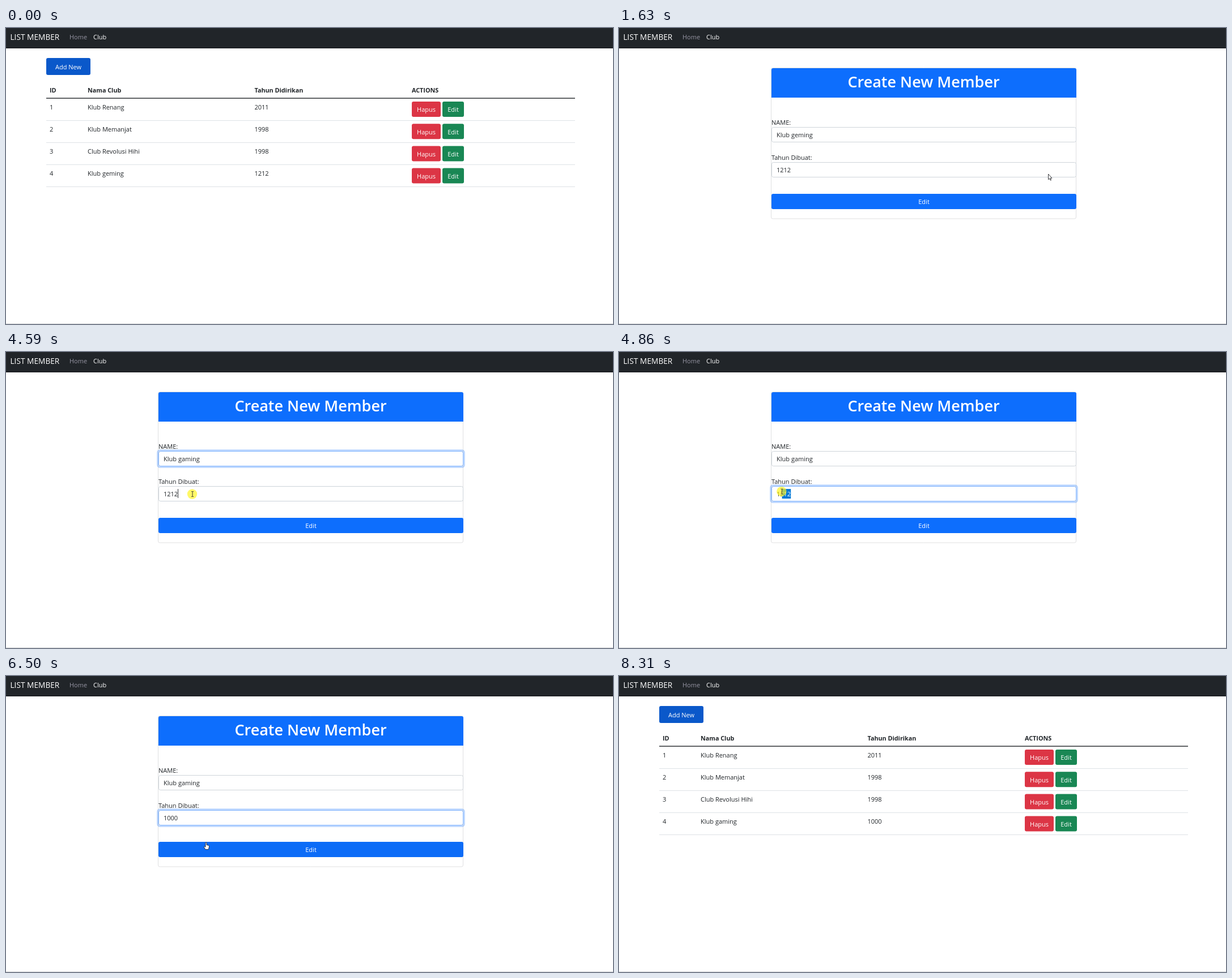
Recreate the animation shown at these times as an HTML page with a canvas. Size 1071 by 523 pixels, loop 8970 ms.

```html
<!DOCTYPE html>
<html lang="id">
<head>
<meta charset="utf-8">
<title>List Member</title>
<style>
html, body { margin: 0; width: 100%; height: 100%; overflow: hidden; background: #fff; }
canvas { display: block; }
</style>
</head>
<body>
<canvas id="stage" width="1071" height="523"></canvas>
<script>
const ctx = document.getElementById('stage').getContext('2d');
const LOOP = 8970, STEP = 68.5;
const INK = '#212529', BLUE = '#0d6efd', LINE = '#ced4da';
const FORM_OPEN = 1630, FORM_CLOSE = 7710;

// Pointer: time, x, y, shape, pressed
const ARROW = 'arrow', HAND = 'hand', BEAM = 'beam', NONE = '';
const track = [
  [0, 1037, 516, NONE], [410, 1037, 516, ARROW], [820, 890, 395, ARROW],
  [1090, 818, 301, ARROW], [1230, 797, 272, HAND], [1300, 794, 268, HAND],
  [1360, 794, 268, HAND, 1], [1430, 794, 268, HAND], [1629, 794, 268, HAND],
  [1630, 757, 258, ARROW], [2050, 530, 222, ARROW], [2320, 345, 195, BEAM],
  [2460, 320, 190, BEAM], [2530, 320, 190, BEAM, 1], [2660, 320, 190, BEAM],
  [2800, 320, 190, NONE], [4180, 320, 190, BEAM], [4450, 329, 246, BEAM],
  [4520, 329, 251, BEAM, 1], [4660, 329, 251, BEAM, 1], [4930, 247, 242, BEAM, 1],
  [5000, 247, 242, BEAM], [5060, 247, 242, ARROW], [5260, 247, 242, ARROW],
  [5400, 261, 248, ARROW], [5660, 261, 248, ARROW], [6090, 345, 287, ARROW],
  [6230, 349, 291, ARROW], [6430, 349, 291, ARROW], [6500, 353, 294, HAND],
  [6900, 361, 298, HAND], [7160, 361, 298, HAND, 1], [7300, 361, 298, HAND],
  [7970, 361, 298, ARROW], [8300, 1071, 490, NONE], [LOOP, 1071, 490, NONE]
];

const clamp = v => Math.max(0, Math.min(1, v));
const ramp = (t, start, len = 140) => clamp((t - start) / len);
const during = (t, a, b) => t >= a && t < b;

function font(size, weight = 400) {
  ctx.font = `${weight} ${size}px "Open Sans", "Noto Sans", sans-serif`;
}

function text(str, x, y, color = INK, size = 11, weight = 400, align = 'left') {
  font(size, weight);
  ctx.fillStyle = color;
  ctx.textAlign = align;
  ctx.fillText(str, x, y);
}

function rect(x, y, w, h, color) {
  ctx.fillStyle = color;
  ctx.fillRect(x, y, w, h);
}

function box(x, y, w, h, r, fill, stroke, width = 1) {
  ctx.beginPath();
  ctx.roundRect(x, y, w, h, r);
  if (fill) { ctx.fillStyle = fill; ctx.fill(); }
  if (stroke) { ctx.strokeStyle = stroke; ctx.lineWidth = width; ctx.stroke(); }
}

function withAlpha(a, draw) {
  if (a <= 0) return;
  ctx.save();
  ctx.globalAlpha = a;
  draw();
  ctx.restore();
}

function ring(x, y, w, h, color, alpha) {
  withAlpha(alpha, () => box(x - 1.4, y - 1.4, w + 2.8, h + 2.8, 4, null, color, 2.8));
}

function button(label, x, y, w, h, color, hover, amount = 0) {
  box(x, y, w, h, 3, color);
  withAlpha(amount, () => box(x, y, w, h, 3, hover));
  text(label, x + w / 2, y + h / 2 + 4.9, '#fff', 11, 400, 'center');
}

function page() {
  rect(0, 0, 1071, 523, '#fff');
  rect(0, 0, 1071, 35, '#212529');
  rect(0, 35, 1071, 1, '#15171b');
  text('LIST MEMBER', 7.5, 21, '#fff', 13.7);
  text('Home', 112, 20, '#9695a3');
  text('Club', 154, 20, '#fff');
  rect(0, 522, 1071, 1, '#d5d6d8');
}

function list(t) {
  const saved = t >= FORM_CLOSE;
  const rows = [
    ['Klub Renang', '2011'], ['Klub Memanjat', '1998'], ['Club Revolusi Hihi', '1998'],
    saved ? ['Klub gaming', '1000'] : ['Klub geming', '1212']
  ];
  button('Add New', 71, 53, 78, 30, '#0a58ca');
  [['ID', 77], ['Nama Club', 144], ['Tahun Didirikan', 438.5], ['ACTIONS', 716]]
    .forEach(([label, x]) => text(label, x, 113.5, INK, 10.8, 700));
  rect(71, 123.4, 933, 1.4, INK);
  rows.forEach(([name, year], i) => {
    const dy = i * 39.2, last = i === 3 && !saved;
    text(String(i + 1), 77, 143.5 + dy);
    text(name, 144, 143.5 + dy);
    text(year, 438.5, 143.5 + dy);
    if (last) ring(770, 130 + dy, 38, 27, 'rgba(25,135,84,.5)', ramp(t, 1330));
    button('Hapus', 716, 130 + dy, 51, 27, '#dc3545');
    button('Edit', 770, 130 + dy, 38, 27, '#198754', '#157347', last ? ramp(t, 1200) : 0);
    rect(71, Math.floor(163 + dy), 933, 1, '#dee2e6');
  });
}

function field(y, value, focus) {
  ring(269, y, 538, 27, 'rgba(13,110,253,.28)', focus);
  box(269.5, y + .5, 537, 26, 3, '#fff', LINE);
  withAlpha(focus, () => box(269.5, y + .5, 537, 26, 3, null, '#86b7fe'));
  text(value, 278, y + 18);
}

function caret(before, y) {
  font(11);
  rect(Math.floor(278 + ctx.measureText(before).width), y, 1, 16, '#33373b');
}

function squiggle(x0, x1, y) {
  ctx.beginPath();
  for (let x = x0; x <= x1; x++) ctx.lineTo(x, y + Math.sin(x * 1.8) * .8);
  ctx.strokeStyle = '#d95555';
  ctx.lineWidth = .9;
  ctx.stroke();
}

function popup(a) {
  withAlpha(clamp(a * 2), () => {
    ctx.save();
    ctx.shadowColor = 'rgba(0,0,0,.35)';
    ctx.shadowBlur = 3;
    ctx.shadowOffsetY = 1;
    box(340, 269, 44, 59, 3, '#fff');
    ctx.restore();
    ctx.beginPath();
    ctx.moveTo(350, 270);
    ctx.lineTo(355.5, 265);
    ctx.lineTo(361, 270);
    ctx.fillStyle = '#fff';
    ctx.fill();
  });
  withAlpha(a, () => {
    text('1998', 349, 289, '#555', 8);
    text('1212', 349, 315, '#555', 8);
  });
}

function form(t, pointer) {
  const name = t < 3560 ? 'Klub geming' : t < 3630 ? 'Klub gming' : 'Klub gaming';
  const year = t < 5400 ? '1212' : '1000'.slice(0, 1 + (t >= 5730) + (t >= 5870) + (t >= 6010));
  const click = ramp(t, 7160);

  box(268.5, 70.5, 538, 266.5, 3, '#fff', '#dfe0e1');
  box(269, 71, 538, 52, [3, 3, 0, 0], BLUE);
  text('Create New Member', 537.5, 105, '#fff', 27, 600, 'center');

  text('NAME:', 269, 171);
  field(175, name, ramp(t, 2530) - ramp(t, 4595));
  if (during(t, 2670, 3560)) squiggle(304, 343, 195);
  if (during(t, 2600, 3300)) caret('Klub ge', 181);
  if (during(t, 3560, 4180)) caret(t < 3630 ? 'Klub g' : 'Klub ga', 181);

  text('Tahun Dibuat:', 269, 233);
  field(237, year, ramp(t, 4590) - click);
  if (during(t, 4660, 5400)) {
    const left = Math.max(278, Math.min(303, pointer.x));
    ctx.save();
    ctx.beginPath();
    ctx.rect(left, 242, 303.2 - left, 17);
    ctx.clip();
    rect(left, 242, 26, 17, '#0078d7');
    text(year, 278, 255, '#fff');
    ctx.restore();
  }
  if (during(t, 4520, 4730) || during(t, 5400, 6200) || during(t, 6700, 7160)) caret(year, 242);

  ring(269, 293, 538, 27, 'rgba(13,110,253,.48)', click);
  button('Edit', 269, 293, 538, 27, BLUE, '#0b5ed7', ramp(t, 6480));
  popup(ramp(t, 5470, 130) - ramp(t, 5730, 130));
}

const shapes = {
  arrow: new Path2D('M.5 0V9.8L2.7 7.8 4.2 11.2 5.6 10.6 4.1 7.3H6.9Z'),
  hand: new Path2D('M-1 .5Q0-1 1 .5V4.5L4.2 5.2Q5.6 5.5 5.5 7L5 10 4 12.5H-1L-3.6 8.5Q-4 6.8-2.5 7.2L-1 8.3Z'),
  beam: new Path2D('M-2-4.5H-.6L0-4 .6-4.5H2M0-4V4M-2 4.5H-.6L0 4 .6 4.5H2')
};

function pointerAt(t) {
  let i = 0;
  while (i < track.length - 2 && track[i + 1][0] <= t) i++;
  const [t0, x0, y0, shape, down] = track[i], [t1, x1, y1] = track[i + 1];
  const held = Math.floor((t - t0) / STEP) * STEP;
  const p = clamp(held / (t1 - t0));
  return { x: x0 + (x1 - x0) * p, y: y0 + (y1 - y0) * p, shape, down };
}

function drawPointer({ x, y, shape, down }) {
  if (!shape) return;
  ctx.save();
  ctx.translate(x, y);
  if (down) {
    ctx.beginPath();
    ctx.arc(-.5, 0, 8.7, 0, Math.PI * 2);
    ctx.fillStyle = 'rgba(255,245,30,.68)';
    ctx.fill();
  }
  ctx.lineWidth = .9;
  ctx.lineJoin = 'round';
  ctx.strokeStyle = '#26282c';
  if (shape !== BEAM) {
    ctx.fillStyle = '#fff';
    ctx.fill(shapes[shape]);
  }
  ctx.stroke(shapes[shape]);
  ctx.restore();
}

function frame(now) {
  const t = now % LOOP, pointer = pointerAt(t);
  page();
  if (during(t, FORM_OPEN, FORM_CLOSE)) form(t, pointer);
  else list(t);
  drawPointer(pointer);
}

const start = performance.now();
function tick() {
  frame(performance.now() - start);
  requestAnimationFrame(tick);
}
tick();
</script>
</body>
</html>
```
